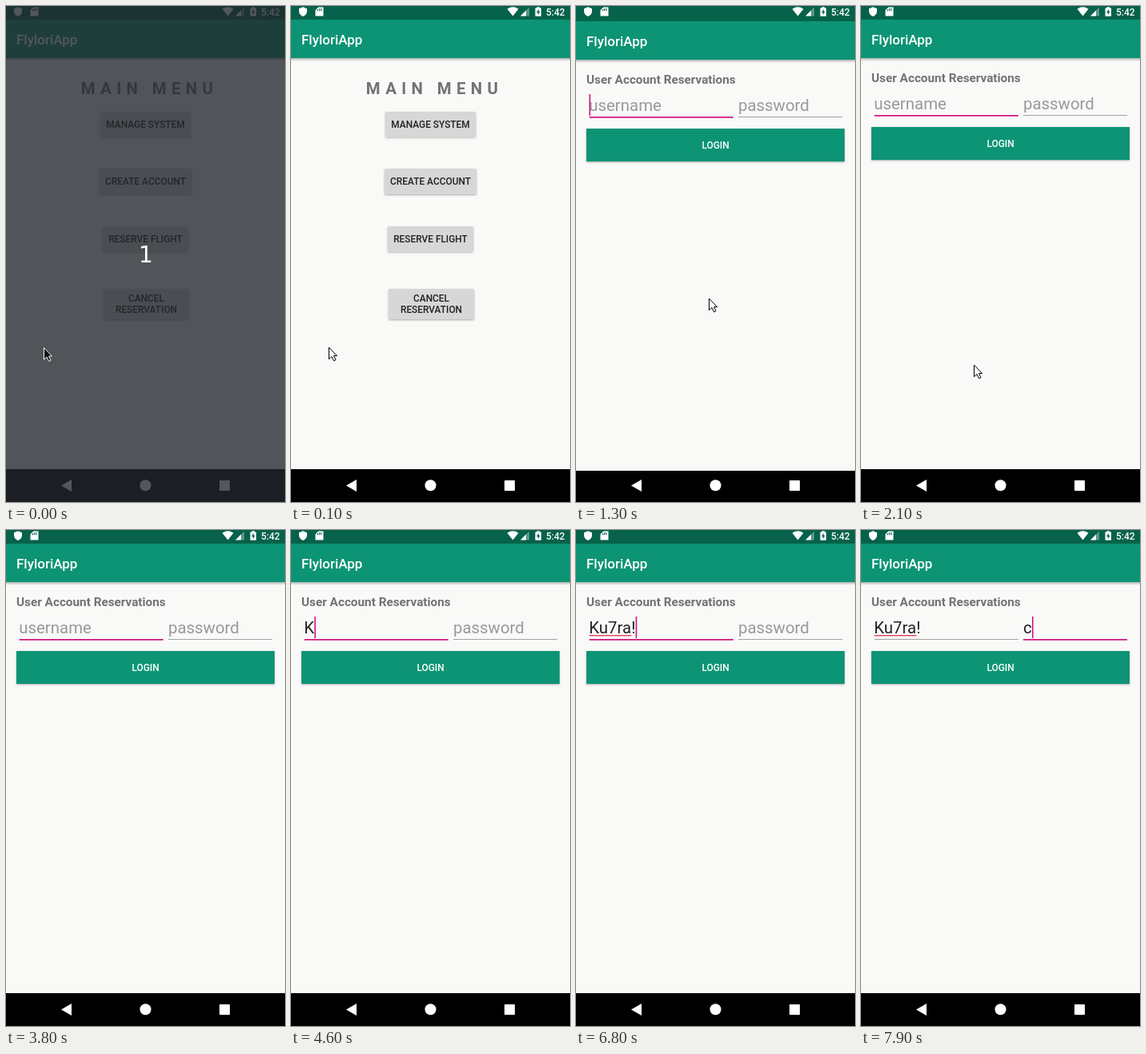
Write an HTML page that moves like this. It is 349 by 619 pixels and loops after 8000 ms.

```html
<!DOCTYPE html>
<html lang="en">
<head>
<meta charset="utf-8">
<title>Reservation login</title>
<style>
  html, body { margin: 0; width: 100%; height: 100%; overflow: hidden; background: #000; }
  svg { display: block; width: 100vw; height: 100vh; }
  text { font-family: Roboto, "Noto Sans", sans-serif; white-space: pre; }
  .title { font-size: 17px; font-weight: 500; fill: #fff; }
  .btn { font-size: 11.9px; font-weight: 500; text-anchor: middle; }
  .field { font-size: 20.4px; fill: #222; }
  .hint { fill: #999; }
  .head { font-weight: 700; fill: #737373; }
  .count { font: 28px "DejaVu Sans", sans-serif; fill: #fff; text-anchor: middle; }
</style>
</head>
<body>
<svg viewBox="0 0 349 619" preserveAspectRatio="none">
  <defs>
    <linearGradient id="fade" x1="0" y1="0" x2="0" y2="1">
      <stop offset="0" stop-color="#000" stop-opacity=".28"/>
      <stop offset="1" stop-color="#000" stop-opacity="0"/>
    </linearGradient>
    <filter id="lift" x="-10%" y="-20%" width="120%" height="150%">
      <feDropShadow dx="0" dy="1" stdDeviation=".8" flood-color="#000" flood-opacity=".32"/>
    </filter>
    <clipPath id="cancelClip"><rect x="122" y="353" width="107" height="38" rx="1.7"/></clipPath>
  </defs>

  <rect width="349" height="619" fill="#f9f9f8"/>
  <rect id="status" width="349" height="17" fill="#06624a"/>

  <g id="page">
    <rect y="65" width="349" height="4" fill="url(#fade)"/>
    <rect y="17" width="349" height="48" fill="#0c9474"/>
    <text class="title" x="13" y="47.5">FlyloriApp</text>

    <g id="menu">
      <text class="head" x="93.8" y="109.5" font-size="20.4" letter-spacing="6.35">MAIN MENU</text>
      <g id="buttons"></g>
      <g clip-path="url(#cancelClip)"><circle id="ripple" cx="168" cy="367" fill="#000" opacity=".12"/></g>
    </g>

    <g id="login">
      <text class="head" x="13" y="94.5" font-size="15.3">User Account Reservations</text>
      <text class="field" id="user" x="16.3" y="129"></text>
      <text class="field" id="pass" x="203" y="129"></text>
      <rect id="userLine" x="16.7" width="180"/>
      <rect id="passLine" x="203" width="130"/>
      <rect id="spell" x="16.5" y="131" height="1.4" fill="#e0405f"/>
      <rect id="caret" y="108" width="1.6" height="27" fill="#d0157a"/>
      <rect x="13" y="151" width="323" height="41" fill="#0c9474" filter="url(#lift)"/>
      <text class="btn" x="174.5" y="175.7" fill="#fff">LOGIN</text>
    </g>
  </g>

  <g fill="#fff">
    <path d="M15 1.2l5 2v3.3c0 3-2 5.500-5 6.500c-3-1-5-3.500-5-6.500V3.200z"/>
    <path d="M34.300 1.500H40.500V12.500H30.500V5.300z"/>
    <path d="M33.500 4v2.200M35.700 3v3.200M37.900 3v3.200" stroke="#06624a" stroke-width="1.100"/>
    <path d="M270.500 3.700Q277.500-1.200 284.500 3.700L277.500 12.500z"/>
    <path d="M298 1.500V12.500H287z" opacity=".35"/>
    <path d="M294 5.500V12.500H287z"/>
    <path d="M305.500 2.500h2V1.200h3.500v1.300h2V12.700h-7.500z"/>
    <path d="M309.800 3.800l-2.800 4.400h1.900v3l2.700-4.400h-1.800z" fill="#06624a"/>
    <text x="319" y="11.500" font-size="12" font-weight="500">5:42</text>
  </g>

  <rect id="nav" y="578" width="349" height="41"/>
  <g fill="#fff">
    <path d="M69 598.500L82 591V606z"/>
    <circle cx="174.500" cy="598.300" r="7"/>
    <rect x="267" y="592" width="13" height="13" rx=".8"/>
  </g>

  <g id="veil">
    <rect width="349" height="619" fill="#23272e" opacity=".78"/>
    <text class="count" x="175" y="319.500">1</text>
  </g>
  <path id="mouse" d="M.5.500V15.200L4 12L6.500 17.300L9 16.200L6.600 11H10.500z" stroke-width="1"/>
</svg>

<script>
const LOOP = 8000, STEP = 100;
const $ = id => document.getElementById(id);
const set = (el, attrs) => { for (const k in attrs) el.setAttribute(k, attrs[k]); };
const show = (el, on) => el.style.display = on ? '' : 'none';

const buttons = [
  [118, 132, 113, 31.5, 'MANAGE SYSTEM'],
  [117, 203, 115, 32, 'CREATE ACCOUNT'],
  [121, 275, 107, 31.5, 'RESERVE FLIGHT'],
  [122, 353, 107, 38, 'CANCEL', 'RESERVATION']
];
$('buttons').innerHTML = buttons.map(([x, y, w, h, ...lines]) => {
  const base = y + h / 2 + 4.3 - (lines.length - 1) * 7;
  return `<rect x="${x}" y="${y}" width="${w}" height="${h}" rx="1.7" fill="#d6d7d6" filter="url(#lift)"/>` +
    lines.map((s, i) => `<text class="btn" x="${x + w / 2}" y="${base + i * 14}" fill="#222">${s}</text>`).join('');
}).join('');

// Pointer stops: time, x, y
const stops = [
  [0, 47, 426], [100, 47, 425.5], [200, 82, 424], [300, 132, 419], [400, 167, 416],
  [600, 167, 388], [700, 166, 364.5], [1700, 164, 375], [1800, 159, 402],
  [1900, 151, 428], [2100, 141, 447.5], [2200, 118, 540]
];
const POINTER_GONE = 2300, PRESS = 900, OPEN = 1300, FOCUS_PASS = 7100;

const NAME = 'Ku7ra!', PASS = 'c';
const nameKeys = [4600, 5100, 5800, 6100, 6300, 6800];
const passKeys = [7900];
const caretOff = [[1700, 2200], [2700, 3200], [3800, 4300], [5700, 5800], [7600, 7900]];

const typed = (text, keys, t) => text.slice(0, keys.filter(k => t >= k).length);

function fill(el, value, hint) {
  el.textContent = value || hint;
  el.classList.toggle('hint', !value);
  return value ? el.getComputedTextLength() : 0;
}

function line(el, active) {
  set(el, active
    ? { y: 136, height: 1.7, fill: '#d0157a' }
    : { y: 136, height: 1, fill: '#a3a3a3' });
}

function drawLogin(t) {
  const onPass = t >= FOCUS_PASS;
  const name = typed(NAME, nameKeys, t);
  const nameWidth = fill($('user'), name, 'username');
  const passWidth = fill($('pass'), typed(PASS, passKeys, t), 'password');
  line($('userLine'), !onPass);
  line($('passLine'), onPass);
  set($('caret'), { x: onPass ? 203.3 + passWidth : 16.5 + nameWidth });
  show($('caret'), !caretOff.some(([a, b]) => t >= a && t < b));
  const marked = name === NAME;
  show($('spell'), marked);
  if (marked) set($('spell'), { width: $('user').getSubStringLength(0, NAME.length - 1) });
}

function draw(t) {
  const open = t >= OPEN;
  const shift = open && t < OPEN + STEP ? 2 : 0;
  set($('page'), { transform: `translate(0 ${shift})` });
  set($('status'), { height: 17 + shift });
  set($('nav'), { y: 578 + shift });
  show($('menu'), !open);
  show($('login'), open);
  if (open) drawLogin(t);
  set($('ripple'), { r: t < PRESS ? 0 : 22 + (t - PRESS) * 0.2 });

  const dim = t < STEP;
  show($('veil'), dim);
  const [, x, y] = stops.filter(s => t >= s[0]).pop();
  set($('mouse'), {
    transform: `translate(${x} ${y})`,
    fill: dim ? '#111' : '#fff',
    stroke: dim ? '#f4f4f4' : '#000'
  });
  show($('mouse'), t < POINTER_GONE);
}

const start = performance.now();
function tick() {
  const t = (performance.now() - start) % LOOP;
  draw(Math.floor(t / STEP) * STEP);
  requestAnimationFrame(tick);
}
tick();
</script>
</body>
</html>
```
